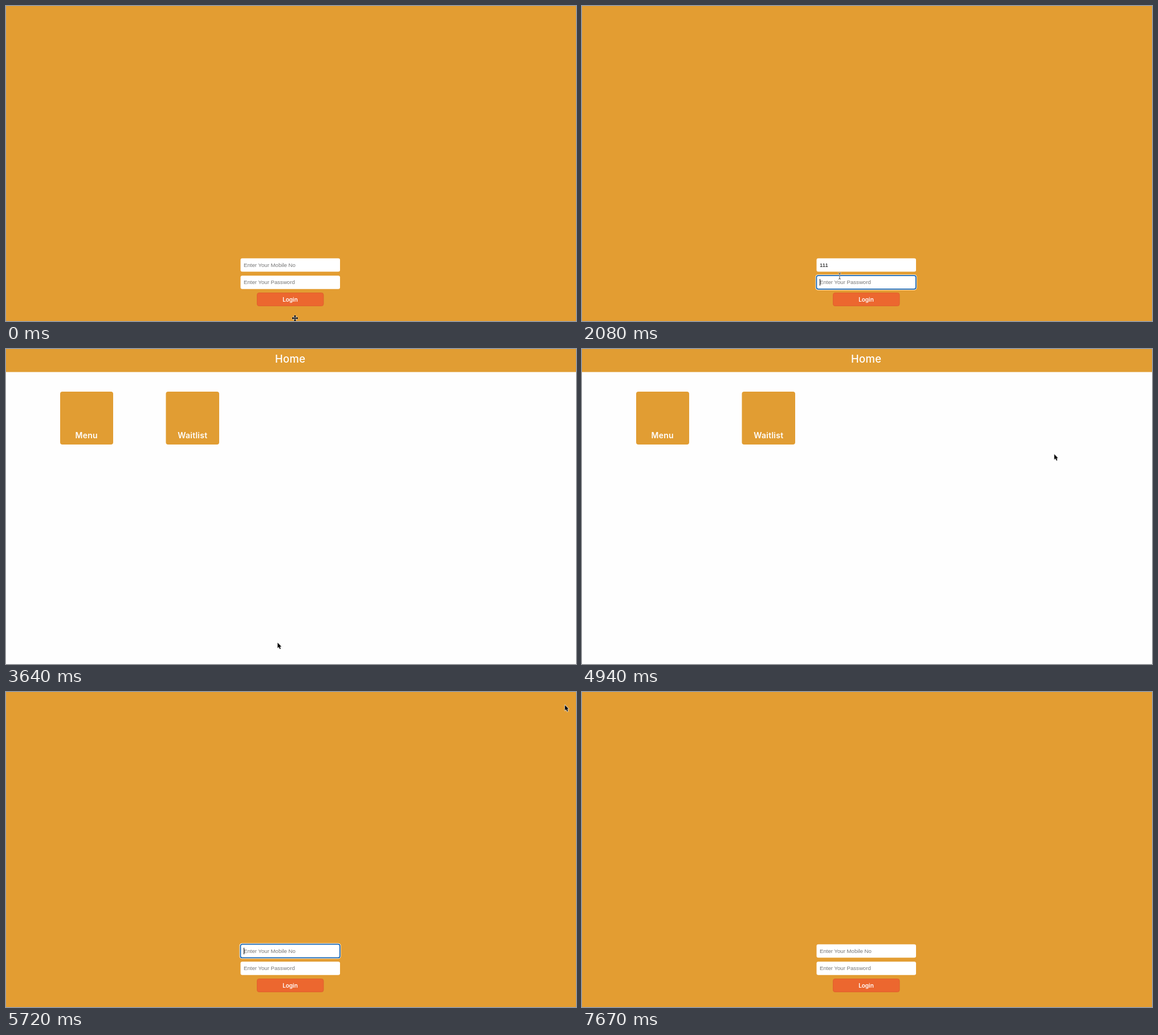
Animation, 1000 px wide and 554 px high, one loop 7800 ms. Source, as an HTML page:

```html
<!DOCTYPE html>
<html lang="en">
<head>
<meta charset="utf-8">
<title>Login and home</title>
<style>
html, body { margin: 0; width: 100%; height: 100%; overflow: hidden; background: #e39d32; }
svg { display: block; width: 100%; height: 100%; }
text { white-space: pre; }
.field { font: 9.62px "Liberation Sans", Arial, sans-serif; fill: #000; }
.hint { fill: #757575; }
.label { font: 600 14px Inter, "Open Sans", sans-serif; letter-spacing: .25px; fill: #fff; text-anchor: middle; }
.label.big { font-size: 18.5px; font-weight: 500; }
.label.small { font-size: 10px; letter-spacing: 0; }

/* Every part shares one 7.8 s clock; screen updates fall on 130 ms ticks. */
svg [id] { animation: 7.8s step-end infinite; }

#hint1 { animation-name: hint1; }
#hint2 { animation-name: hint2; }
#focus1 { animation-name: focus1; }
#focus2 { animation-name: focus2; }
#caret1 { animation-name: caret1, blink; }
#caret2 { animation-name: caret2; }
#digit1 { animation-name: digit1; }
#digit2 { animation-name: digit2; }
#digit3 { animation-name: digit3; }
#dot1 { animation-name: dot1; }
#dot2 { animation-name: dot2; }
#dot3 { animation-name: dot3; }
#home { animation-name: home; }
#blank { animation-name: blank; }
#pointer { animation-name: move; }
#cross { animation-name: cross; }
#beam { animation-name: beam; }
#arrow { animation-name: arrow; }

@keyframes hint1 { 0% { opacity: 1 } 15% { opacity: 0 } 50% { opacity: 1 } }
@keyframes hint2 { 0% { opacity: 1 } 28.33% { opacity: 0 } 50% { opacity: 1 } }
@keyframes focus1 {
  0% { opacity: 0 } 8.33% { opacity: 1 } 25% { opacity: 0 }
  73.33% { opacity: 1 } 98.33% { opacity: 0 }
}
@keyframes focus2 { 0% { opacity: 0 } 25% { opacity: 1 } 41.66% { opacity: 0 } }
@keyframes caret1 {
  0% { transform: none } 15% { transform: translateX(5px) } 16.66% { transform: translateX(10px) }
  20% { transform: translateX(15px) } 50% { transform: none }
}
@keyframes blink { 0% { opacity: 1 } 80% { opacity: 0 } 85% { opacity: 1 } 93.33% { opacity: 0 } }
@keyframes caret2 {
  0% { transform: none } 28.33% { transform: translateX(4px) } 30% { transform: translateX(7.5px) }
  35% { transform: translateX(11px) }
}
@keyframes digit1 { 0% { opacity: 0 } 15% { opacity: 1 } 50% { opacity: 0 } }
@keyframes digit2 { 0% { opacity: 0 } 16.66% { opacity: 1 } 50% { opacity: 0 } }
@keyframes digit3 { 0% { opacity: 0 } 20% { opacity: 1 } 50% { opacity: 0 } }
@keyframes dot1 { 0% { opacity: 0 } 28.33% { opacity: 1 } 50% { opacity: 0 } }
@keyframes dot2 { 0% { opacity: 0 } 30% { opacity: 1 } 50% { opacity: 0 } }
@keyframes dot3 { 0% { opacity: 0 } 35% { opacity: 1 } 50% { opacity: 0 } }
@keyframes home { 0% { opacity: 0 } 46.66% { opacity: 1 } 71.66% { opacity: 0 } }
@keyframes blank { 0% { opacity: 0 } 71.66% { opacity: 1 } 73.33% { opacity: 0 } }

@keyframes move {
  0% { transform: translate(507px, 549px); animation-timing-function: steps(4) }
  6.66% { transform: translate(425px, 457px) }
  20% { transform: translate(425px, 457px); animation-timing-function: steps(4) }
  26.66% { transform: translate(452px, 475px) }
  35% { transform: translate(452px, 475px); animation-timing-function: steps(4) }
  41.66% { transform: translate(476px, 516px) }
  51.66% { transform: translate(476px, 516px); animation-timing-function: steps(6) }
  61.66% { transform: translate(790px, 225px); animation-timing-function: steps(5) }
  70% { transform: translate(980px, 22.5px) }
  75% { transform: translate(980px, 22.5px); animation-timing-function: steps(6) }
  85%, 100% { transform: translate(520px, 570px) }
}
@keyframes cross { 0% { opacity: 1 } 1.66% { opacity: 0 } }
@keyframes beam { 0% { opacity: 0 } 5% { opacity: 1 } 40% { opacity: 0 } }
@keyframes arrow { 0% { opacity: 0 } 1.66% { opacity: 1 } 5% { opacity: 0 } 40% { opacity: 1 } }
</style>
</head>
<body>
<svg viewBox="0 0 1000 554" preserveAspectRatio="none">
  <defs>
    <rect id="box" x="411.5" width="174.5" height="23.5" rx="3" fill="#fff"/>
    <g id="ring">
      <rect x="409.5" y="-2" width="178" height="27.5" rx="4.5" fill="#fff" fill-opacity=".85"/>
      <rect x="411.4" y="-.1" width="174.4" height="23.7" rx="3" fill="#fff" stroke="#1766b5" stroke-width="1.8"/>
    </g>
    <path id="stem" d="M417.5 6V17.5" stroke="#000"/>
  </defs>

  <rect width="1000" height="554" fill="#e39d32"/>
  <rect width="1" height="554" fill="#dba144"/>

  <use href="#box" y="443.8"/>
  <use href="#box" y="474.2"/>
  <g id="focus1">
    <use href="#ring" y="443.8"/>
    <g id="caret1"><use href="#stem" y="443.8"/></g>
  </g>
  <g id="focus2">
    <use href="#ring" y="474.2"/>
    <g id="caret2"><use href="#stem" y="474.2"/></g>
  </g>

  <g class="field">
    <text id="hint1" class="hint" x="417" y="459">Enter Your Mobile No</text>
    <text id="hint2" class="hint" x="417" y="489">Enter Your Password</text>
    <text id="digit1" x="417" y="459">1</text>
    <text id="digit2" x="421.8" y="459">1</text>
    <text id="digit3" x="426.6" y="459">1</text>
    <circle id="dot1" cx="419.2" cy="485.8" r="1.4"/>
    <circle id="dot2" cx="422.6" cy="485.8" r="1.4"/>
    <circle id="dot3" cx="426" cy="485.8" r="1.4"/>
  </g>

  <rect x="440.5" y="504.5" width="116.5" height="23" rx="3.5" fill="#ec672f" stroke="#df622c"/>
  <text class="label small" x="498.5" y="519.7">Login</text>

  <g id="home">
    <rect width="1000" height="554" fill="#fefefe"/>
    <rect width="1000" height="40.5" fill="#e19d33"/>
    <rect x="95" y="75" width="93" height="93" rx="4" fill="#e19d33"/>
    <rect x="280.5" y="75" width="93.5" height="93" rx="4" fill="#e19d33"/>
    <text class="label big" x="498.7" y="24">Home</text>
    <text class="label" x="141.2" y="157">Menu</text>
    <text class="label" x="327.3" y="157">Waitlist</text>
  </g>
  <rect id="blank" width="1000" height="554" fill="#fefefe"/>

  <g id="pointer">
    <g id="cross">
      <path d="M-4 0H4M0 -4V4" stroke="#fff" stroke-width="3"/>
      <path d="M0 -5.5L2.5 -2.8H-2.5ZM0 5.5L2.5 2.8H-2.5ZM-5.5 0L-2.8 -2.5V2.5ZM5.5 0L2.8 -2.5V2.5Z" stroke="#fff" stroke-width=".8" paint-order="stroke"/>
      <path d="M-4 0H4M0 -4V4" stroke="#000" stroke-width="1.4"/>
    </g>
    <g id="beam" fill="none">
      <path d="M-2.5 -5.5Q0 -5.5 0 -3.5Q0 -5.5 2.5 -5.5M0 -3.5V3.5M-2.5 5.5Q0 5.5 0 3.5Q0 5.5 2.5 5.5" stroke="#fff" stroke-opacity=".7" stroke-width="2"/>
      <path d="M-2 -5.5Q0 -5.5 0 -3.5Q0 -5.5 2 -5.5M0 -3.5V3.5M-2 5.5Q0 5.5 0 3.5Q0 5.5 2 5.5" stroke="#222" stroke-width=".8"/>
    </g>
    <path id="arrow" d="M.5 .5V10L2.7 8L4.3 11.8L6 11.1L4.4 7.4H7.3Z" stroke="#fff" stroke-width="1.4" stroke-linejoin="round" paint-order="stroke"/>
  </g>
</svg>
</body>
</html>
```
